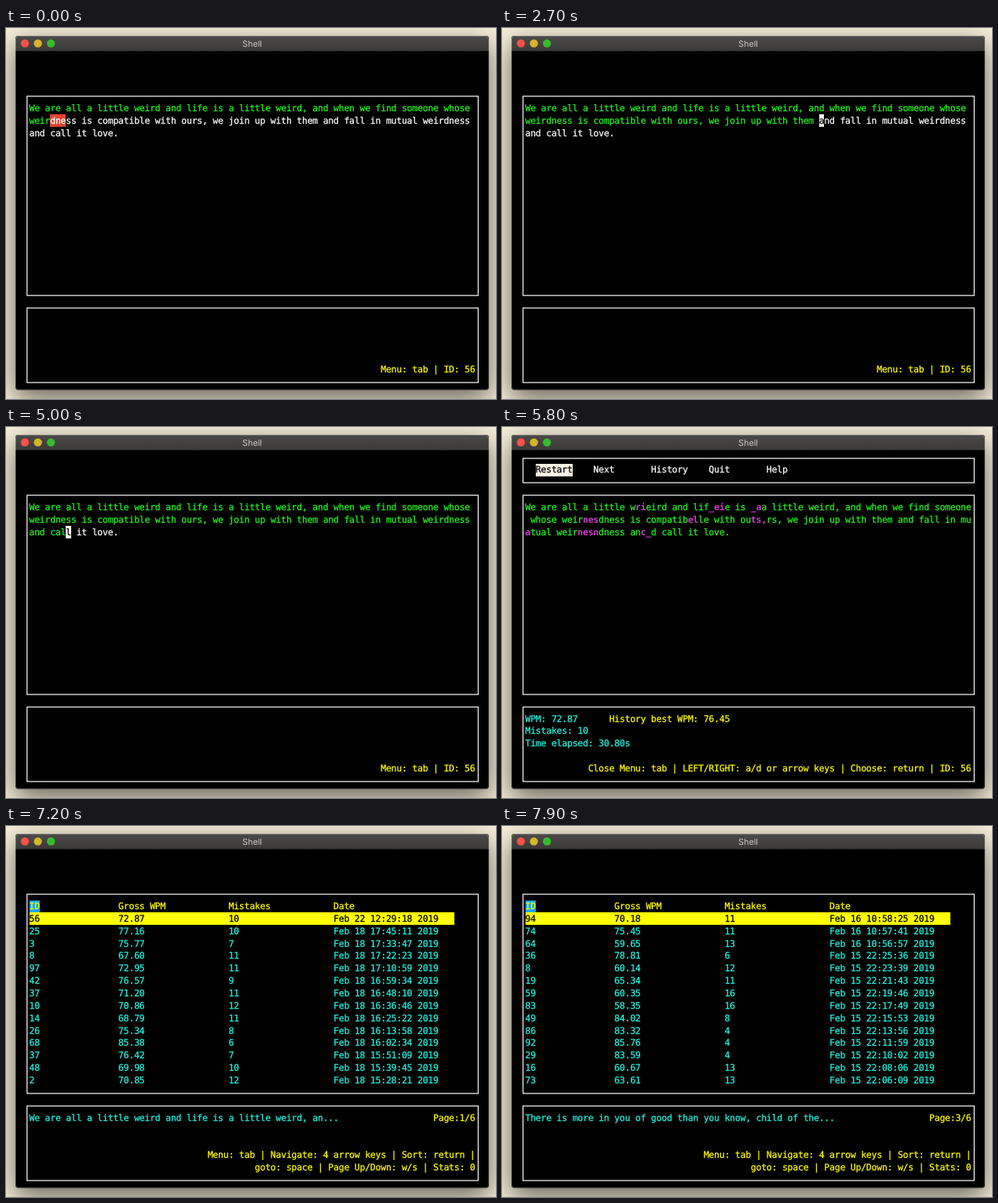
Animation, 624 px wide and 473 px high, one loop 8000 ms. Source, as an HTML page with a canvas:

```html
<!DOCTYPE html>
<html lang="en">
<head>
<meta charset="utf-8">
<title>Shell</title>
<style>
html, body { margin: 0; width: 100%; height: 100%; overflow: hidden; background: #f8efd8; }
canvas { display: block; width: 624px; height: 473px; }
</style>
</head>
<body>
<canvas id="stage"></canvas>
<script>
const LOOP = 8000, STEP = 100;
const W = 624, H = 473;
const COLS = 85, CELL_W = 6.682, CELL_H = 15.86, LEFT = 29.6, TOP = 94.6;
const FONT = '11.5px "DejaVu Sans Mono", "Liberation Mono", monospace';
const GREEN = '#23f41f', YELLOW = '#ffff00', CYAN = '#1ef5e0', MAGENTA = '#d63ad2';
const WHITE = '#fff', BLACK = '#000', CREAM = '#fdf5e6', RED = '#e0442f', BLUE = '#16a6e6';

// Brackets hold the wrong keys typed before each correction.
const SCRIPT = 'We are all a little w[ri]eird and lif[_ei]e is [_a]a little weird, and when we find ' +
  'someone whose weir[nes]dness is compatib[el]le with ou[ts,]rs, we join up with them and ' +
  'fall in mu[a]tual weir[nesn]dness an[c_]d call it love.';

const goal = SCRIPT.replace(/\[.*?\]/g, '');
const result = [];
const keys = [{ pos: 0, wrong: 0 }];

// Builds the annotated result and one state per key press.
function parseScript() {
  let pos = 0;
  for (const part of SCRIPT.split(/(\[.*?\])/)) {
    const bad = part[0] === '[';
    const text = bad ? part.slice(1, -1) : part;
    for (const ch of text) result.push({ ch, bad });
    if (bad) {
      const n = text.length;
      for (let i = 1; i <= 2 * n; i++) keys.push({ pos, wrong: n - Math.abs(n - i) });
    } else {
      for (const _ of text) keys.push({ pos: ++pos, wrong: 0 });
    }
  }
}
parseScript();

const DONE = 5500, MENU = 5700, HISTORY = 6700;
const keyAt = (pos, wrong) => keys.findIndex(k => k.pos === pos && k.wrong === wrong);
const pace = [
  [0, keyAt(89, 3)],
  [1700, keyAt(118, 0)],
  [3700, keyAt(162, 0)],
  [5000, keyAt(177, 0)],
  [DONE, keys.length - 1]
];

function typingState(t) {
  let i = 0;
  while (i < pace.length - 2 && t >= pace[i + 1][0]) i++;
  const [t0, k0] = pace[i], [t1, k1] = pace[i + 1];
  return keys[Math.floor(k0 + (k1 - k0) * (t - t0) / (t1 - t0) + 1e-6)];
}

// Each session spreads its runs evenly from its latest to its earliest time.
const PAGE_ROWS = 14;
const sessions = [
  { day: 22, from: '12:29:18', to: '12:29:18', runs: 1 },
  { day: 18, from: '17:45:11', to: '15:28:21', runs: 13 },
  { day: 17, from: '16:42:08', to: '15:20:30', runs: 14 },
  { day: 16, from: '10:58:25', to: '10:56:57', runs: 3 },
  { day: 15, from: '22:25:36', to: '22:06:09', runs: 11 }
];
const pages = [
  { top: [56, '72.87', 10], note: 'We are all a little weird and life is a little weird, an...' },
  { top: [41, '75.32', 9], note: 'The day is long enough for those who take the time to...' },
  { top: [94, '70.18', 11], note: 'There is more in you of good than you know, child of the...' }
];

const toSeconds = clock => clock.split(':').reduce((sum, n) => sum * 60 + +n, 0);
const toClock = s => [s / 3600, s / 60 % 60, s % 60]
  .map(n => String(Math.floor(n)).padStart(2, '0')).join(':');

function makeRows() {
  let seed = 56;
  const rand = () => (seed = seed * 16807 % 2147483647) / 2147483647;
  const rows = [];
  for (const { day, from, to, runs } of sessions) {
    const a = toSeconds(from), b = toSeconds(to);
    for (let i = 0; i < runs; i++) {
      const wpm = 58 + rand() * 28;
      const mistakes = Math.round(10 - (wpm - 72) / 3 + rand() * 4 - 2);
      const clock = toClock(Math.round(a + (b - a) * i / Math.max(1, runs - 1)));
      rows.push([Math.floor(rand() * 98), wpm.toFixed(2), mistakes, `Feb ${day} ${clock} 2019`]);
    }
  }
  pages.forEach(({ top }, p) => rows[p * PAGE_ROWS].splice(0, 3, ...top));
  return rows;
}
const history = makeRows();

const canvas = document.getElementById('stage');
const ctx = canvas.getContext('2d');
const dpr = window.devicePixelRatio || 1;
canvas.width = W * dpr;
canvas.height = H * dpr;
ctx.scale(dpr, dpr);

const colX = c => LEFT + c * CELL_W;
const rowY = r => TOP + r * CELL_H;

function fillCells(col, row, count, color) {
  const x = Math.round(colX(col)), y = Math.round(rowY(row));
  ctx.fillStyle = color;
  ctx.fillRect(x, y, Math.round(colX(col + count)) - x, Math.round(rowY(row + 1)) - y);
}

function put(col, row, str, color, bg, bold) {
  if (bg) fillCells(col, row, str.length, bg);
  ctx.font = (bold ? 'bold ' : '') + FONT;
  ctx.textAlign = 'left';
  ctx.fillStyle = ctx.strokeStyle = color;
  ctx.lineWidth = 0.25;
  for (let i = 0; i < str.length; i++) {
    if (str[i] === ' ') continue;
    const x = colX(col + i) - 0.1, y = rowY(row) + 11.4;
    ctx.fillText(str[i], x, y);
    if (!bold) ctx.strokeText(str[i], x, y);
  }
}

const putRight = (row, str, color) => put(COLS - str.length, row, str, color);

function box(firstRow, lastRow) {
  const y = Math.ceil(rowY(firstRow) + CELL_H / 2);
  const bottom = Math.ceil(rowY(lastRow) + CELL_H / 2);
  ctx.strokeStyle = WHITE;
  ctx.lineWidth = 1.2;
  ctx.strokeRect(26.8, y, 574.5, bottom - y);
}

function panel(x, y, w, h, radii) {
  ctx.beginPath();
  ctx.roundRect(x, y, w, h, radii);
}

function drawWindow() {
  ctx.fillStyle = '#f8efd8';
  ctx.fillRect(0, 0, W, H);

  ctx.save();
  ctx.shadowColor = 'rgba(0,0,0,.6)';
  ctx.shadowBlur = 34 * dpr;
  ctx.shadowOffsetY = 11 * dpr;
  ctx.fillStyle = BLACK;
  panel(12, 10, 603, 451.5, 4);
  ctx.fill();
  ctx.restore();

  const bar = ctx.createLinearGradient(0, 10, 0, 29);
  bar.addColorStop(0, '#4d4b49');
  bar.addColorStop(1, '#3c3a38');
  ctx.fillStyle = bar;
  panel(12, 10, 603, 19.5, [4, 4, 0, 0]);
  ctx.fill();

  ctx.strokeStyle = 'rgba(255,255,255,.2)';
  ctx.lineWidth = 1;
  panel(12.5, 10.5, 602, 450.5, 4);
  ctx.stroke();

  ['#fb5049', '#d5b52a', '#35bc2c'].forEach((color, i) => {
    ctx.fillStyle = color;
    ctx.beginPath();
    ctx.arc(24 + i * 16.6, 19.6, 5.2, 0, Math.PI * 2);
    ctx.fill();
  });

  ctx.font = '10.8px Inter, Roboto, sans-serif';
  ctx.textAlign = 'center';
  ctx.fillStyle = '#cbc9c6';
  ctx.fillText('Shell', 313.5, 23.8);

  box(-1, 15);
  box(16, 22);
}

function drawTyping(t) {
  const { pos, wrong } = typingState(t);
  [...goal].forEach((ch, i) => {
    let color = i < pos ? GREEN : WHITE, bg = null;
    if (i >= pos && i < pos + wrong) bg = RED;
    else if (i === pos && !wrong) {
      color = BLACK;
      bg = CREAM;
    }
    put(i % COLS, Math.floor(i / COLS), ch, color, bg);
  });
  putRight(21, 'Menu: tab | ID: 56', YELLOW);
}

function drawResult(t) {
  result.forEach(({ ch, bad }, i) => {
    put(i % COLS, Math.floor(i / COLS), ch, bad ? MAGENTA : GREEN, null, bad);
  });
  put(0, 17, 'WPM: 72.87', CYAN);
  put(16, 17, 'History best WPM: 76.45', YELLOW);
  put(0, 18, 'Mistakes: 10', CYAN);
  put(0, 19, 'Time elapsed: 30.80s', CYAN);

  if (t < MENU) {
    putRight(21, 'Menu: tab | ID: 56', YELLOW);
    return;
  }
  const choice = t < 6200 ? 0 : t < 6400 ? 1 : 2;
  box(-4, -2);
  ['Restart', 'Next', 'History', 'Quit', 'Help'].forEach((name, i) => {
    const on = i === choice;
    put(2 + 11 * i, -3, name, on ? BLACK : WHITE, on ? CREAM : null);
  });
  putRight(21, 'Close Menu: tab | LEFT/RIGHT: a/d or arrow keys | Choose: return | ID: 56', YELLOW);
}

function drawHistory(t) {
  const page = t < 7500 ? 0 : t < 7800 ? 1 : 2;
  const cols = [0, 17, 38, 58];
  ['ID', 'Gross WPM', 'Mistakes', 'Date'].forEach((name, i) => {
    put(cols[i], 0, name, YELLOW, i ? null : BLUE);
  });
  fillCells(0, 1, 81, YELLOW);
  history.slice(page * PAGE_ROWS, (page + 1) * PAGE_ROWS).forEach((row, r) => {
    row.forEach((value, i) => put(cols[i], r + 1, String(value), r ? CYAN : BLACK));
  });
  put(0, 17, pages[page].note, CYAN);
  putRight(17, `Page:${page + 1}/6`, YELLOW);
  putRight(20, 'Menu: tab | Navigate: 4 arrow keys | Sort: return |', YELLOW);
  putRight(21, 'goto: space | Page Up/Down: w/s | Stats: 0', YELLOW);
}

function draw(t) {
  ctx.textRendering = 'geometricPrecision';
  drawWindow();
  if (t < DONE) drawTyping(t);
  else if (t < HISTORY) drawResult(t);
  else drawHistory(t);
}

const start = performance.now();
let last = -1;
function tick() {
  const elapsed = (performance.now() - start) % LOOP;
  const t = Math.floor(elapsed / STEP) * STEP;
  if (t !== last) draw(last = t);
  requestAnimationFrame(tick);
}
tick();
</script>
</body>
</html>
```
